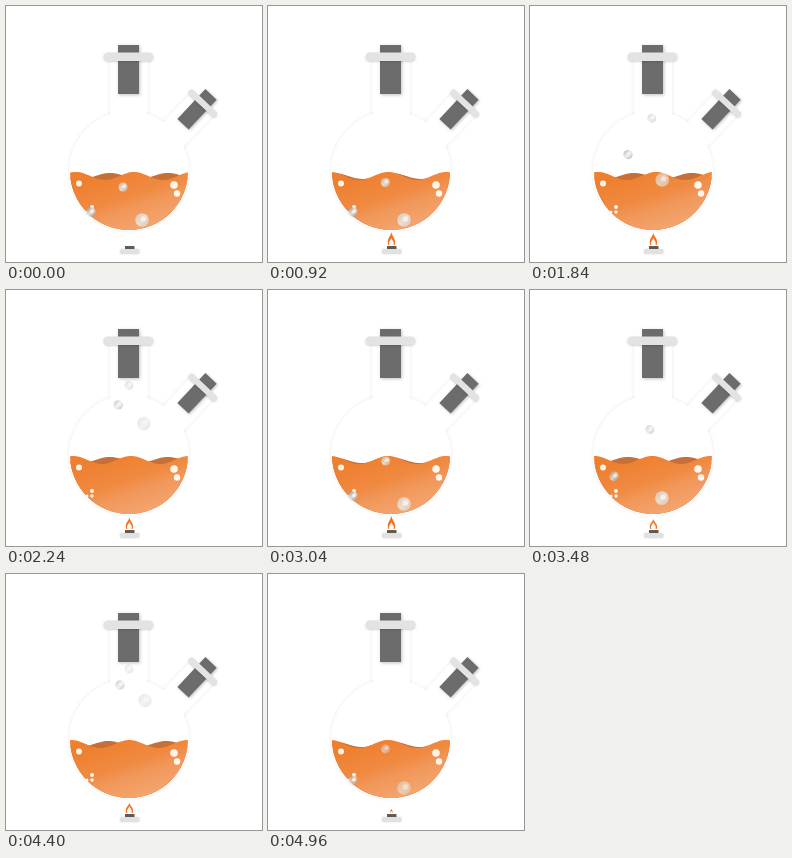
An HTML page with a canvas that plays this animation: 256 px wide and 256 px high, repeating every 5000 ms.

```html
<!DOCTYPE html>
<html lang="en">
<head>
<meta charset="utf-8">
<title>Flask</title>
<style>
html, body { margin: 0; width: 100%; height: 100%; overflow: hidden; background: #fff; }
canvas { display: block; width: 256px; height: 256px; }
</style>
</head>
<body>
<canvas id="stage" width="256" height="256"></canvas>
<script>
const ctx = document.getElementById('stage').getContext('2d');
const LOOP = 5000, CYCLE = 2000, TAU = Math.PI * 2;
const BOWL = { x: 123, y: 165, r: 59 };

// Each bubble waits, then eases from one point to another with a sideways sway.
const RISERS = [
  { from: [117, 181], to: [123, 95], r: 4.5, wait: 700, rise: 1600, sway: 0, tint: '#bdb6ab' },
  { from: [136, 214], to: [139, 126], r: 6.8, wait: 1300, rise: 1150, sway: -6, tint: '#d2cfc9' },
  { from: [85, 206], to: [114, 111], r: 4.7, wait: 1100, rise: 1300, sway: -7, tint: '#8d8a85' }
];

const clamp = v => Math.min(1, Math.max(0, v));
const mix = (a, b, k) => a + (b - a) * k;
const smooth = v => { const k = clamp(v); return k * k * (3 - 2 * k); };

function disc(x, y, r, fill) {
  ctx.beginPath();
  ctx.arc(x, y, r, 0, TAU);
  ctx.fillStyle = fill;
  ctx.fill();
}

function box(x, y, w, h, r, fill) {
  ctx.beginPath();
  ctx.roundRect(x, y, w, h, r);
  ctx.fillStyle = fill;
  ctx.fill();
}

function shadow(color, blur, dx = 0, dy = 0) {
  ctx.shadowColor = color;
  ctx.shadowBlur = blur;
  ctx.shadowOffsetX = dx;
  ctx.shadowOffsetY = dy;
}

function placed(x, y, angle, draw) {
  ctx.save();
  ctx.translate(x, y);
  ctx.rotate(angle);
  draw();
  ctx.restore();
}

const onNeck = draw => placed(122.5, 50, 0, draw);
const onArm = draw => placed(191, 103.3, Math.PI * .24, draw);

function glass() {
  ctx.save();
  shadow('rgba(0,0,0,.09)', 3);
  onNeck(() => box(-18.5, 5, 38, 65, 0, '#fff'));
  onArm(() => box(-16, -6, 32, 60, 0, '#fff'));
  disc(BOWL.x, BOWL.y, BOWL.r + 1, '#fff');
  ctx.restore();
  onNeck(() => box(-17.5, 5, 36, 66, 0, '#fff'));
  onArm(() => box(-15, -6, 30, 60, 0, '#fff'));
}

function stopper(w, top, h, collarW, collarY, collarH) {
  shadow('rgba(0,0,0,.24)', 3, 1, 1);
  box(-w / 2, top, w, h, 0, '#6c6c6c');
  shadow('rgba(0,0,0,.16)', 2, 0, 1);
  box(-collarW / 2, collarY, collarW, collarH, collarH / 2, '#e3e3e1');
}

function wave(crest, height, fill) {
  ctx.beginPath();
  ctx.moveTo(62, 228);
  for (let x = 62; x <= 184; x += 2)
    ctx.lineTo(x, 170 - height * Math.cos((x - crest) / 58 * TAU));
  ctx.lineTo(184, 228);
  ctx.fillStyle = fill;
  ctx.fill();
}

function liquid(t) {
  const swell = (1 - Math.cos(t / CYCLE * TAU)) / 2;
  const body = ctx.createLinearGradient(105, 166, 125, 226);
  body.addColorStop(0, '#ee7f2f');
  body.addColorStop(.45, '#f08a41');
  body.addColorStop(.65, '#f1975a');
  body.addColorStop(1, '#f3a56e');
  ctx.save();
  ctx.beginPath();
  ctx.arc(BOWL.x, BOWL.y, BOWL.r, 0, TAU);
  ctx.clip();
  wave(mix(162, 122, swell ** 3), 3, '#c56f39');
  wave(mix(128, 120, Math.sqrt(swell)), 4, body);
  ctx.restore();
  for (const [x, y, r] of [[73, 177.5, 3], [168, 179, 3.8], [171, 187.5, 3.2], [86, 201, 2], [81, 206, 1.5], [86, 206, 1.7]])
    disc(x, y, r, 'rgba(255,252,248,.94)');
}

function bubble(x, y, r, alpha, tint) {
  const g = ctx.createLinearGradient(x - r, y - r, x + r, y + r);
  g.addColorStop(0, tint);
  g.addColorStop(.5, '#ebe8e3');
  g.addColorStop(1, tint);
  ctx.globalAlpha = alpha * .85;
  disc(x, y, r, g);
  disc(x + r * .2, y - r * .15, r * .4, 'rgba(255,255,255,.65)');
  ctx.globalAlpha = 1;
}

function risers(t) {
  for (const { from, to, r, wait, rise, sway, tint } of RISERS)
    for (let age = t, first = true; age >= 0; age -= CYCLE, first = false) {
      const k = smooth((age - wait) / rise);
      const x = mix(from[0], to[0], k) + sway * Math.sin(Math.PI * Math.sqrt(k));
      const shown = first ? 1 : clamp((age - 800) / 240);
      const fade = 1 - clamp((age - wait - rise) / 400);
      bubble(x, mix(from[1], to[1], k), r, shown * fade * mix(1, .6, k), tint);
    }
}

function flameShape(h, w, fill) {
  ctx.beginPath();
  ctx.moveTo(123.5, 239 - h);
  ctx.bezierCurveTo(124, 239 - h * .65, 123.5 + w, 239 - h * .5, 123.5 + w * .65, 239);
  ctx.lineTo(123.5 - w * .65, 239);
  ctx.bezierCurveTo(123.5 - w, 239 - h * .5, 122, 239 - h * .6, 123.5, 239 - h);
  ctx.fillStyle = fill;
  ctx.fill();
}

function burner(t) {
  const size = Math.min(1, t / 320, (LOOP - t) / 130);
  const flicker = Math.cos(t / 1000 * TAU);
  const h = (11.5 + 1.5 * flicker) * size;
  if (h > .1) {
    flameShape(h, 5 * size, '#ef7426');
    flameShape(h * (.6 - .08 * flicker), 3.2 * size, '#fff8ef');
  }
  box(119, 240, 9.5, 4, 0, '#625c59');
  ctx.save();
  shadow('rgba(0,0,0,.14)', 2);
  box(114, 243, 19.5, 5, 2, '#e1e1df');
  ctx.restore();
}

function draw(t) {
  ctx.fillStyle = '#fff';
  ctx.fillRect(0, 0, 256, 256);
  glass();
  onNeck(() => stopper(21, -11, 49, 50, -3.5, 8.5));
  onArm(() => stopper(15.5, -20.5, 41, 37, -11.5, 6.2));
  liquid(t);
  risers(t);
  burner(t);
}

const began = performance.now();
function frame() {
  draw((performance.now() - began) % LOOP);
  requestAnimationFrame(frame);
}
frame();
</script>
</body>
</html>
```
